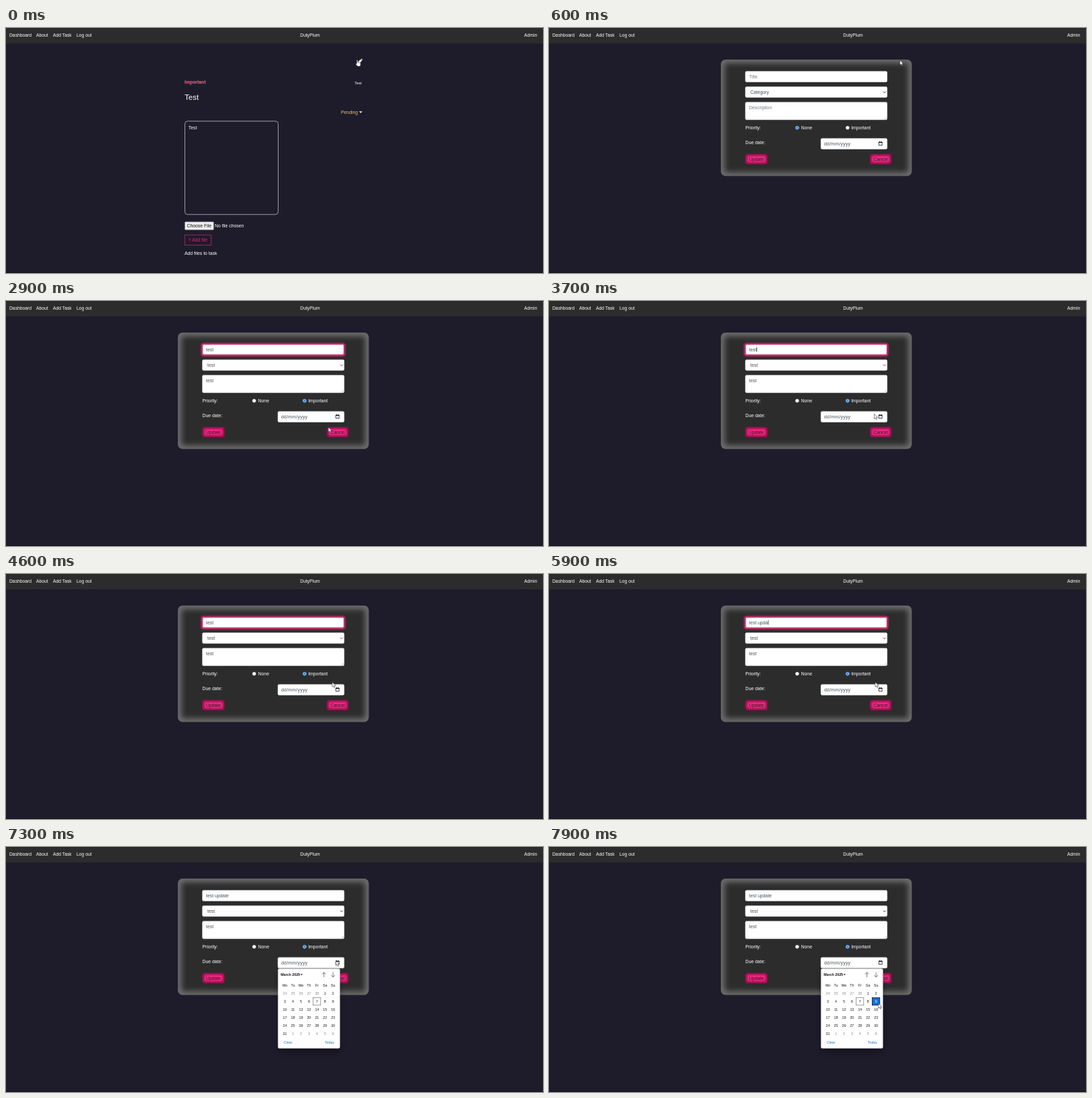
An HTML page for the animation above (8000 ms loop, 800 by 365 pixels).

```html
<!DOCTYPE html>
<html lang="en">
<head>
<meta charset="utf-8">
<title>Edit task</title>
<style>
  html, body { margin: 0; width: 100%; height: 100%; overflow: hidden; background: #1e1c2b; }
  svg { display: block; width: 100vw; height: 100vh; }
  text { font-family: Arial, "Liberation Sans", sans-serif; white-space: pre; }
</style>
</head>
<body>
<svg id="stage" viewBox="0 0 800 365">
  <defs>
    <filter id="blur1" x="-30%" y="-60%" width="160%" height="220%"><feGaussianBlur stdDeviation="1.2"/></filter>
    <filter id="blur5" x="-20%" y="-20%" width="140%" height="140%"><feGaussianBlur stdDeviation="4.5"/></filter>
    <clipPath id="cardClip"><rect x="256" y="47" width="284.5" height="173.5" rx="7"/></clipPath>
  </defs>
</svg>
<script>
const LOOP = 8000, STEP = 100;
const OPEN = 300, FILL = 800, FOCUS = 1400, TYPE = 4900, TYPED = 6200, PICK = 7200, HOVER = 7700;
const stage = document.getElementById('stage');

function add(parent, tag, attrs, content) {
  const node = document.createElementNS('http://www.w3.org/2000/svg', tag);
  for (const key in attrs) node.setAttribute(key, attrs[key]);
  if (content !== undefined) node.textContent = content;
  parent.appendChild(node);
  return node;
}
const group = (parent, attrs = {}) => add(parent, 'g', attrs);
const rect = (parent, x, y, width, height, fill, more = {}) =>
  add(parent, 'rect', { x, y, width, height, fill, ...more });
const path = (parent, d, stroke, more = {}) =>
  add(parent, 'path', { d, fill: 'none', stroke, ...more });
// y is the middle of the capitals
const label = (parent, x, y, content, fill = '#fff', size = 6.85, more = {}) =>
  add(parent, 'text', { x, y: y + size * .36, fill, 'font-size': size, ...more }, content);
const show = (node, on) => node.setAttribute('visibility', on ? 'inherit' : 'hidden');

// Page and navigation bar
rect(stage, 0, 0, 800, 365, '#1e1c2b');
rect(stage, 0, 0, 800, 23, '#2c2c2c');
rect(stage, 0, 0, 800, .8, '#222');
rect(stage, 0, 364, 800, 1, '#131219');
[[5, 'Dashboard'], [45, 'About'], [70, 'Add Task'], [105, 'Log out'], [772, 'Admin']]
  .forEach(([x, name]) => label(stage, x, 11, name, '#fff', 6.75));
label(stage, 453, 11, 'DutyPlum', '#fff', 6.75, { 'text-anchor': 'middle' });

// Task details
const task = group(stage);
path(task, 'M523 54l.6-2.6 4.6-4.6 2 2-4.6 4.6zM528.7 46.2l.8-.6 1.8 1.8-.7.9z', 'none', { fill: '#fff' });
label(task, 266, 81, 'Important', '#ff6584', 6.85, { 'font-weight': 700 });
label(task, 519.3, 82, 'Test', '#fff', 5.8);
label(task, 266, 102.6, 'Test', '#fff', 11.6);
label(task, 499, 125.4, 'Pending', '#e3c370');
path(task, 'M526 124.2h4.8l-2.4 2.5z', 'none', { fill: '#fff' });
rect(task, 266.5, 138.8, 139, 139, 'none', { rx: 4, stroke: '#a9adb8', 'stroke-width': .9 });
label(task, 271.8, 149, 'Test');
rect(task, 266.4, 288.8, 43, 12, '#efefef', { rx: 1, stroke: '#777', 'stroke-width': .6 });
label(task, 269.5, 294.6, 'Choose File', '#111');
label(task, 311, 294.6, 'No file chosen');
rect(task, 266.4, 308.3, 39.3, 15.2, 'none', { stroke: '#b0205f', 'stroke-width': .9 });
label(task, 271.7, 316, '+ Add file', '#e0246e');
label(task, 266, 336, 'Add files to task');

// Edit form
const form = group(stage);
const card = group(form, { 'clip-path': 'url(#cardClip)' });
rect(card, 256, 47, 284.5, 173.5, '#2c2c2c');
rect(card, 256, 47, 284.5, 173.5, 'none',
  { rx: 7, stroke: '#757575', 'stroke-width': 10, filter: 'url(#blur5)' });

const focusRing = group(form);
rect(focusRing, 292, 64, 212, 17, 'none', { rx: 2, stroke: '#e0206f', 'stroke-width': 2.6, filter: 'url(#blur1)' });
const field = (x, y, w, h) =>
  rect(form, x, y, w, h, '#fff', { rx: 2, stroke: '#ced4da', 'stroke-width': .5 });
field(292.5, 64.4, 211.3, 16);
field(292.5, 87.4, 211.3, 16);
field(292.5, 110.4, 211.3, 26.3);
field(405, 164.4, 98.8, 16);
const focusLine = rect(form, 292.8, 64.7, 210.7, 15.4, 'none', { rx: 2, stroke: '#cf1f6b', 'stroke-width': 1.1 });

const title = label(form, 298, 72.2, '', '#495057');
const category = label(form, 300, 95.8, '', '#495057');
const description = label(form, 298, 118.2, '', '#495057');
const caret = rect(form, 0, 68.8, .7, 6.8, '#222');
const chevron = path(form, 'M498 94.7l1.9 1.9 1.9-1.9', '#333', { 'stroke-width': 1 });
path(form, 'M499.8 135.7l3-3M501.6 135.9l1.3-1.3', '#888', { 'stroke-width': .5 });

label(form, 292.5, 148.6, 'Priority:');
label(form, 375.6, 148.6, 'None');
label(form, 450.2, 148.6, 'Important');
label(form, 292.5, 170.4, 'Due date:');
const radios = [369.7, 444.8].map(cx => {
  add(form, 'circle', { cx, cy: 148.6, r: 2.7, fill: '#fff', stroke: '#888', 'stroke-width': .4 });
  const on = group(form);
  add(on, 'circle', { cx, cy: 148.6, r: 2.4, fill: '#fff', stroke: '#0d6fd0', 'stroke-width': .9 });
  add(on, 'circle', { cx, cy: 148.6, r: 1.4, fill: '#0d6fd0' });
  return on;
});
label(form, 410, 172.2, 'dd/mm/yyyy', '#495057', 6.85, { 'letter-spacing': .28 });
path(form, 'M491.4 170h4.8v4.8h-4.8z', '#111', { 'stroke-width': .8 });
path(form, 'M491 170.5h5.6M492.4 168.8v1M495.2 168.8v1', '#111', { 'stroke-width': 1.1 });

function button(x, width, name) {
  rect(form, x - .5, 187.8, width + 1, 15, '#b3105a', { rx: 3.5, filter: 'url(#blur1)', opacity: .6 });
  rect(form, x, 188.2, width, 14.2, '#a90f56', { rx: 3 });
  rect(form, x + 2.6, 190.8, width - 5.2, 9, '#ee2b80', { rx: 2, filter: 'url(#blur1)' });
  label(form, x + width / 2, 195.3, name, '#2c1420', 6.85, { 'text-anchor': 'middle' });
}
button(293, 32, 'Update');
button(478.6, 31, 'Cancel');

// Date picker
const picker = group(stage);
rect(picker, 406, 186, 91, 119, '#000', { rx: 3, opacity: .4, filter: 'url(#blur5)' });
rect(picker, 405.2, 181.2, 92.2, 118.8, '#fff', { rx: 2, stroke: '#bbb', 'stroke-width': .5 });
label(picker, 409.2, 190.2, 'March 2025', '#111', 5.3, { 'font-weight': 700 });
path(picker, 'M438.8 189.2h3l-1.5 2z', 'none', { fill: '#111' });
path(picker, 'M473.6 194v-7.2m-2.8 2.8l2.8-2.8 2.8 2.8M487.2 186.6v7.2m-2.8-2.8l2.8 2.8 2.8-2.8', '#444', { 'stroke-width': .7 });
const columnX = column => 415.5 + 11.95 * column;
const centred = { 'text-anchor': 'middle' };
['Mo', 'Tu', 'We', 'Th', 'Fr', 'Sa', 'Su']
  .forEach((day, i) => label(picker, columnX(i), 206.2, day, '#111', 5.2, centred));
rect(picker, 457.5, 224.4, 11.3, 11.3, 'none', { stroke: '#777', 'stroke-width': .7 });
const hovered = rect(picker, 481.5, 224.4, 11.3, 11.3, '#0b74e5', { stroke: '#111', 'stroke-width': .8 });
const days = [];
for (let i = 0; i < 42; i++) {
  const date = new Date(2025, 1, 24 + i);
  days.push(label(picker, columnX(i % 7), 218.2 + 12 * Math.floor(i / 7), date.getDate(),
    date.getMonth() === 2 ? '#111' : '#888', 5.2, centred));
}
const ninth = days[13];
label(picker, 414, 291.6, 'Clear', '#1673c8', 5.2);
label(picker, 475, 291.6, 'Today', '#1673c8', 5.2);

// Mouse pointers, tip at the origin
const pointer = group(stage);
const outline = { fill: '#fff', 'stroke-width': .5, 'stroke-linejoin': 'round' };
const arrow = path(pointer, 'M0 0v7.2l1.7-1.5 1.2 2.6 1.2-.6-1.1-2.5h2.2z', '#111', outline);
const hand = path(pointer, 'M0 .6q.8-1 1.5 0v3.2l3.6.8q.9.3.8 1.2l-.7 3.8h-4l-2.9-3.4q.2-1.2 1.7-.1z', '#222', outline);
const beam = path(pointer, 'M-1.5-3.4q1.2 0 1.5.6.3-.6 1.5-.6M-1.5 3.4q1.2 0 1.5-.6.3.6 1.5.6M0-2.8v5.6', '#222', { 'stroke-width': .7 });

// time, x, y
const route = [
  [0, 522.5, 47.5], [600, 522.8, 48], [800, 522.8, 48], [1300, 450.5, 73], [1900, 450.5, 73],
  [2500, 480.2, 188], [3100, 480.2, 188], [3500, 484, 171], [4100, 486, 161], [5900, 486, 161],
  [6200, 488, 166], [6700, 491.5, 169.5], [7300, 491.5, 169.5], [7700, 490.7, 233], [8000, 490.7, 233]
];
function pointerAt(t) {
  const i = route.findIndex(stop => stop[0] > t);
  const [t0, x0, y0] = route[i - 1], [t1, x1, y1] = route[i];
  const p = (t - t0) / (t1 - t0), e = p * p * (3 - 2 * p);
  return [x0 + (x1 - x0) * e, y0 + (y1 - y0) * e];
}

function typedTitle(t) {
  const suffix = ' update';
  const share = Math.max(0, Math.min(1, (t - TYPE) / (TYPED - TYPE)));
  return 'test' + suffix.slice(0, Math.floor(share * suffix.length));
}
function caretOn(t) {
  if (t >= TYPE && t < TYPED) return true;
  if (t >= 4400 && t < TYPE) return false;
  return (t - (t < TYPE ? FOCUS : TYPED)) % 1000 < 500;
}

function draw(t) {
  const editing = t >= OPEN, filled = t >= FILL, focused = t >= FOCUS && t < PICK;
  show(task, !editing);
  show(form, editing);
  show(picker, t >= PICK);

  title.textContent = filled ? typedTitle(t) : 'Title';
  category.textContent = filled ? 'test' : 'Category';
  description.textContent = filled ? 'test' : 'Description';
  for (const node of [title, description]) node.setAttribute('fill', filled ? '#495057' : '#777c82');
  show(radios[0], !filled);
  show(radios[1], filled);

  show(focusRing, focused);
  show(focusLine, focused);
  chevron.setAttribute('stroke', focused ? '#b02a5c' : '#333');
  show(caret, focused && caretOn(t));
  caret.setAttribute('x', 298.3 + title.getComputedTextLength());

  show(hovered, t >= HOVER);
  ninth.setAttribute('fill', t >= HOVER ? '#fff' : '#111');

  const [x, y] = pointerAt(t);
  const overTitle = editing && x < 504 && y > 64 && y < 81;
  pointer.setAttribute('transform', `translate(${x} ${y})`);
  show(hand, !editing);
  show(beam, overTitle);
  show(arrow, editing && !overTitle);
}

const start = performance.now();
function tick() {
  const t = (performance.now() - start) % LOOP;
  draw(Math.floor(t / STEP) * STEP);
  requestAnimationFrame(tick);
}
draw(0);
requestAnimationFrame(tick);
</script>
</body>
</html>
```
